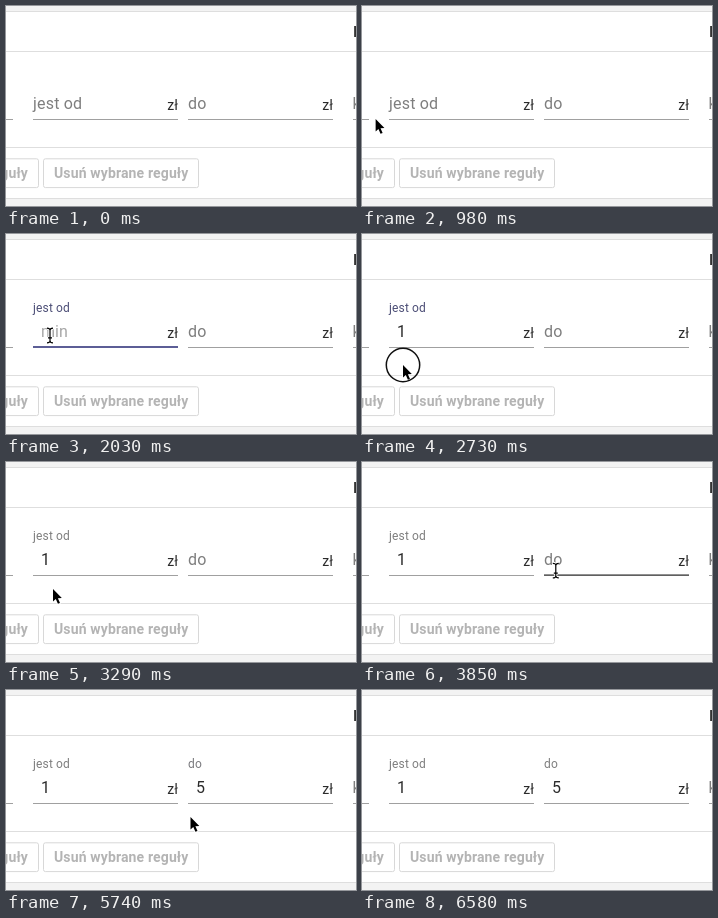
These frames come from a looping animation (350x200 px, 7.35 s). An HTML page with a canvas:

```html
<!DOCTYPE html>
<html lang="pl">
<head>
<meta charset="utf-8">
<style>
  html, body { margin: 0; width: 100%; height: 100%; overflow: hidden; background: #fff; }
  canvas { display: block; width: 350px; height: 200px; }
</style>
</head>
<body>
<canvas id="stage"></canvas>
<script>
const W = 350, H = 200, LOOP = 7350, STEP = 70, FIELD_W = 145;
const canvas = document.getElementById('stage');
const ctx = canvas.getContext('2d');
const dpr = window.devicePixelRatio || 1;
canvas.width = W * dpr;
canvas.height = H * dpr;

const GREY = [126, 126, 126], FOCUS = [76, 78, 118];
const INK = [28, 28, 28], ACCENT = [92, 94, 150];
const LINE = '#a0a0a0', RULE = '#dedede', BAND = '#f3f3f3', DARK = '#2b2b2b', OFF = '#b4b4b4';

const fields = [
  { x: 27, label: 'jest od', hint: 'min', value: '1', hover: 1120, focus: 1470, typed: 2240, blur: 2730 },
  { x: 182, label: 'do', hint: 'max', value: '5', hover: 3780, focus: 4130, typed: 5040, blur: 5530 }
];

// Pointer stops: time, x, y
const stops = [
  [840, 3, 117], [1260, 44, 101.5], [2240, 44, 101.5],
  [2730, 41, 131], [3150, 47, 127], [3290, 47, 127],
  [3920, 199, 108], [5040, 199, 107],
  [5530, 191.5, 131], [5740, 184.5, 127], [6230, 353, 121]
];

const clamp = v => Math.max(0, Math.min(1, v));
const easeOut = v => 1 - Math.pow(1 - clamp(v), 3);
const smooth = v => v * v * (3 - 2 * v);
const mix = (a, b, k) => a + (b - a) * k;
const blend = (a, b, k) => `rgb(${a.map((v, i) => Math.round(mix(v, b[i], k)))})`;

function rect(x, y, w, h, color) {
  ctx.fillStyle = color;
  ctx.fillRect(x, y, w, h);
}

function text(str, x, y, size, color, weight = 400, align = 'left') {
  ctx.font = `${weight} ${size}px Roboto, sans-serif`;
  ctx.textAlign = align;
  ctx.fillStyle = color;
  ctx.fillText(str, x, y);
}

function faded(alpha, draw) {
  ctx.globalAlpha = alpha;
  draw();
  ctx.globalAlpha = 1;
}

function button(x, w) {
  ctx.strokeStyle = '#d8d8d8';
  ctx.lineWidth = 1;
  ctx.beginPath();
  ctx.roundRect(x + 0.5, 152.8, w, 28.8, 2);
  ctx.stroke();
}

function drawPage() {
  rect(0, 0, W, H, '#fff');
  rect(0, 0, W, 5, BAND);
  rect(0, 193, W, 7, BAND);
  for (const y of [5, 45, 141, 192]) rect(0, y, W, 1, RULE);
  text('K', 347.2, 31, 14, '#333', 700);
  text('k', 346.4, 103, 16, blend(GREY, GREY, 0));
  rect(0, 113, 7, 1, LINE);
  rect(347, 113, 3, 1, LINE);
  button(-40, 72);
  button(37, 155);
  ctx.letterSpacing = '0.14px';
  text('reguły', 22, 172.4, 14, OFF, 700, 'right');
  text('Usuń wybrane reguły', 48, 172.4, 14, OFF, 700);
  ctx.letterSpacing = '0px';
}

function drawField(f, t) {
  const focused = t >= f.focus && t < f.blur;
  const typed = t >= f.typed;
  const lift = easeOut((t - f.focus) / 300);
  const tint = t < f.blur ? lift : 1 - easeOut((t - f.blur) / 400);

  rect(f.x, 113, FIELD_W, 1, LINE);
  if (t >= f.hover && t < f.blur) {
    faded(easeOut((t - f.hover) / 350), () =>
      rect(f.x, 112, FIELD_W, 2, blend(INK, ACCENT, lift)));
  }

  ctx.save();
  ctx.translate(f.x, mix(103, 77.5, lift));
  const scale = mix(1, 0.75, lift);
  ctx.scale(scale, scale);
  ctx.letterSpacing = '0.2px';
  text(f.label, 0, 0, 16, blend(GREY, FOCUS, tint));
  ctx.restore();

  text('zł', f.x + FIELD_W, 104, 14, DARK, 400, 'right');

  if (typed) {
    text(f.value, f.x + 8, 103, 16, DARK);
  } else if (focused) {
    faded(easeOut((t - f.focus - 70) / 210), () =>
      text(f.hint, f.x + 8, 103, 16, '#a6a6a6'));
  }

  const caret = focused && (typed || t < f.focus + 560);
  if (caret) rect(f.x + (typed ? 17 : 8), 88, 1, 19, '#222');
}

function pointerAt(t) {
  const typing = fields.some(f => t >= f.typed && t < f.typed + 200);
  const next = stops.findIndex(s => s[0] > t);
  if (typing || next < 1) return null;
  const [t0, x0, y0] = stops[next - 1], [t1, x1, y1] = stops[next];
  const k = smooth((t - t0) / (t1 - t0));
  return { x: mix(x0, x1, k), y: mix(y0, y1, k) };
}

function drawArrow() {
  ctx.beginPath();
  [[0, 0], [0, 12.6], [2.8, 10], [4.9, 14.8], [7, 13.9], [4.9, 9.3], [8.8, 9.1]]
    .forEach(p => ctx.lineTo(...p));
  ctx.closePath();
  ctx.lineJoin = 'round';
  ctx.lineWidth = 2;
  ctx.strokeStyle = '#fff';
  ctx.stroke();
  ctx.fillStyle = '#000';
  ctx.fill();
}

function drawBeam() {
  ctx.beginPath();
  for (const s of [-1, 1]) {
    ctx.moveTo(-3, s * 7.3);
    ctx.quadraticCurveTo(0, s * 7.3, 0, s * 5.2);
    ctx.quadraticCurveTo(0, s * 7.3, 3, s * 7.3);
  }
  ctx.moveTo(0, -5.5);
  ctx.lineTo(0, 5.5);
  ctx.moveTo(-2, 2.4);
  ctx.lineTo(2, 2.4);
  for (const [w, c] of [[3, '#fff'], [1.2, '#000']]) {
    ctx.lineWidth = w;
    ctx.strokeStyle = c;
    ctx.stroke();
  }
}

function drawPointer(t) {
  const p = pointerAt(t);
  if (!p) return;
  const inside = p.y < 115 && fields.some(f => p.x >= f.x && p.x < f.x + FIELD_W);
  ctx.save();
  ctx.translate(p.x, p.y);
  (inside ? drawBeam : drawArrow)();

  const clicked = fields.some(f => [f.focus, f.blur].some(c => t >= c && t < c + 140));
  if (clicked) {
    ctx.strokeStyle = '#111';
    ctx.lineWidth = 1.5;
    ctx.beginPath();
    ctx.arc(0, 0, 16.7, 0, Math.PI * 2);
    ctx.stroke();
  }
  ctx.restore();
}

let start;
function frame(now) {
  start ??= now;
  const t = Math.floor(((now - start) % LOOP) / STEP) * STEP;
  ctx.setTransform(dpr, 0, 0, dpr, 0, 0);
  drawPage();
  fields.forEach(f => drawField(f, t));
  drawPointer(t);
  requestAnimationFrame(frame);
}
requestAnimationFrame(frame);
</script>
</body>
</html>
```
